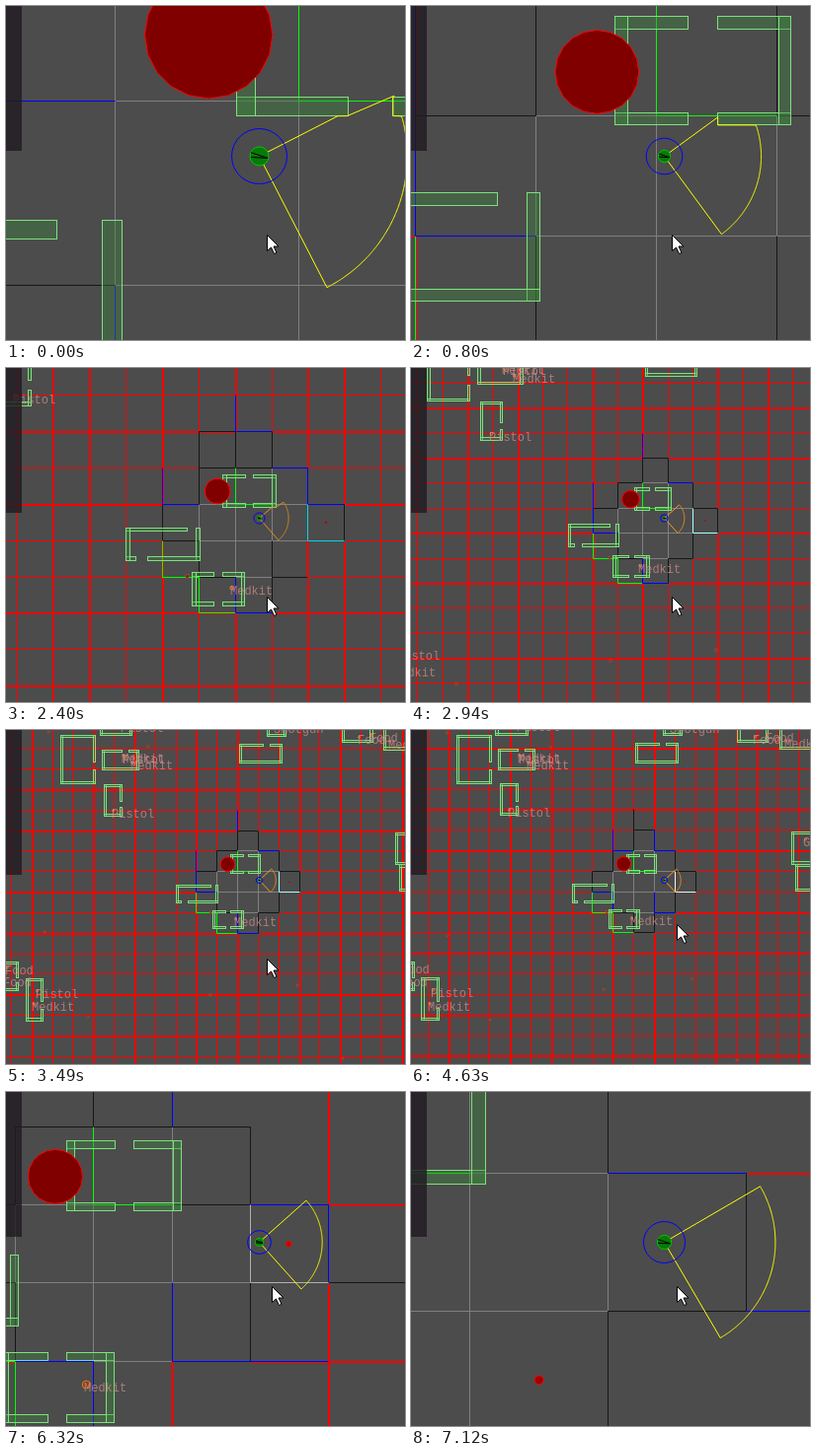
An HTML page with a canvas that plays this animation: 404 by 339 pixels, repeating every 7190 ms.

```html
<!DOCTYPE html>
<html>
<head>
<meta charset="utf-8">
<style>
html, body { margin: 0; width: 404px; height: 339px; overflow: hidden; background: #4c4c4c; }
canvas { display: block; }
</style>
</head>
<body>
<canvas id="stage" width="404" height="339"></canvas>
<script>
const ctx = document.getElementById('stage').getContext('2d');
const W = 404, H = 339, LOOP = 7190, STEP = 67.2, CX = 256.5, CY = 152.5;
const BG = '#4c4c4c';

// Monotone cubic through a few keys, in steps of the clock
const KEYS = [0, 23, 36, 52, 69, 94, 106];
function curve(vals) {
  const n = vals.length, d = [], m = [];
  for (let i = 0; i < n - 1; i++) d.push((vals[i + 1] - vals[i]) / (KEYS[i + 1] - KEYS[i]));
  for (let i = 0; i < n; i++) {
    if (i === 0) m.push(d[0]);
    else if (i === n - 1) m.push(d[n - 2]);
    else m.push(d[i - 1] * d[i] <= 0 ? 0 : 2 * d[i - 1] * d[i] / (d[i - 1] + d[i]));
  }
  return t => {
    if (t >= KEYS[n - 1]) return vals[n - 1] + m[n - 1] * (t - KEYS[n - 1]);
    let i = 0;
    while (t >= KEYS[i + 1]) i++;
    const h = KEYS[i + 1] - KEYS[i], u = (t - KEYS[i]) / h, v = 1 - u;
    return vals[i] * (1 + 2 * u) * v * v + m[i] * h * u * v * v +
      vals[i + 1] * u * u * (3 - 2 * u) - m[i + 1] * h * u * u * v;
  };
}
const logZoom = curve([186.5, 79, 36.85, 20.83, 20.83, 79.3, 140].map(Math.log));
const heroX = curve([0.784, 1.33, 1.66, 2.05, 2.487, 3.114, 3.406]);
const heroY = curve([0.299, 0.368, 0.383, 0.418, 0.437, 0.478, 0.501]);
const facing = curve([17.8, 4, 4, 2, 2, 3.2, 14.7]);

// Sector edge colours, in cell units; xs and ys are the heavy grid lines
const PHASES = [
  { end: 10, xs: [], ys: [], blue: 'M-1 0H0M0 1V2', black: '', grey: 'M0 -1V0' },
  { end: 29, xs: [-1, 3], ys: [-1, 1],
    blue: 'M0 -1H1M2 -1H3V0M-1 -1V1H0M1 2V3', black: 'M-1 0H0M2 0H3M2 -1V0M2 1V2',
    red: 'M3 1V2', pale: '#00ffff' },
  { end: 44, xs: [-4, -3, -1, 1, 3, 4], ys: [-2, 0, 3, 5],
    blue: 'M1 -3V-2H2M2 -1H3V0M-1 -1V0H0M3 0H4M1 2V3H2', black: 'M0 -2V0M0 -2H1M0 -1H2M2 1V2',
    red: 'M3 1V2', pale: '#00d8e8' },
  { end: 61, xs: [-9, -6, -4, -1, 1, 4, 6, 9], ys: [-7, -4, -2, 1, 3, 6, 8],
    blue: 'M1 -3V-2M-1 -1V1H0M2 -1H3M1 2V3H2', black: 'M0 -1H1', pale: '#a8ffff' },
  { end: 82, xs: [-8, -5, -3, 0, 2, 5, 7], ys: [-6, -3, -1, 2, 4, 7, 9],
    blue: 'M0 -2V-1H1M2 -2V-1H3M-1 1H0V2M2 1V2H3', black: 'M1 -3V-2', pale: '#f0f0f0' },
  { end: 100, xs: [2, 4], ys: [0, 2],
    blue: 'M2 -3V-1M3 0H4V1M2 1V2H4M0 2H1M1 2V3', black: 'M0 -1H3V0M3 1V2M4 1H6M2 0H3',
    red: 'M2 2V4', pale: '#b0b0b0' },
  { end: 999, xs: [], ys: [0], blue: 'M3 0H4M4 1H5', black: 'M4 0V1M3 1V2M3 -1V0' }
];
const RIM = 'M1 -2H2V-1H3V0H4V1H3V2H2V3H1V2H0V1H-1V0H0V-1H1V-2';
const GREEN = 'M-1 1V2H0M0 2V3H1M1 -1V0H2';

const T = 0.102;
function doorHouse(x, y) {
  return [[x, y, 0.607, T], [x + 0.85, y, 0.605, T], [x, y + 0.798, 0.607, T],
    [x + 0.85, y + 0.798, 0.605, T], [x, y, T, 0.9], [x + 1.353, y, T, 0.9]];
}
// Far house with one door on the long side
function farHouse(x, y, x2, y2) {
  const w = x2 - x, h = y2 - y, wide = w > h;
  const list = [[x, y, T, h], [x, y2 - T, w, T]];
  if (wide) list.push([x2 - T, y, T, h], [x, y, w * 0.55, T], [x + w * 0.72, y, w * 0.28, T]);
  else list.push([x, y, w, T], [x2 - T, y, T, h * 0.55], [x2 - T, y + h * 0.72, T, h * 0.28]);
  return list;
}
const NEAR = doorHouse(0.66, -0.82);
const WALLS = [
  ...NEAR, ...doorHouse(-0.19, 1.885),
  [-1.99, 0.646, 1.675, T], [-0.068, 0.646, 0.105, 0.9], [-1.99, 1.444, 0.27, T],
  [-1.418, 1.444, 1.455, T], [-1.99, 0.646, T, 0.9],
  ...farHouse(-7.6, -6.63, -5.91, -4.28), ...farHouse(-5.6, -5.94, -3.8, -4.95),
  ...farHouse(-5.7, -7.2, -4.13, -6.63), ...farHouse(-5.5, -4.26, -4.6, -2.72),
  ...farHouse(1.1, -6.22, 3.17, -5.29), ...farHouse(2.45, -7.4, 3.37, -6.6),
  ...farHouse(6.06, -7.5, 7.55, -6.3), ...farHouse(8.08, -7.2, 9.9, -5.94),
  ...farHouse(8.67, -1.9, 10, -0.35), ...farHouse(8.85, -0.33, 10.4, 0.97),
  ...farHouse(-9.3, 5.2, -8.44, 7.26), ...farHouse(-10.6, 4.42, -9.64, 5.8)
];
const ITEMS = [
  ['Medkit', 0.905, 2.3], ['Medkit', -4.55, -5.65], ['Pistol', -4.5, -5.6],
  ['Medkit', -4.13, -5.3], ['Pistol', -5.05, -2.98], ['Pistol', -4.6, -7.15],
  ['Pistol', -8.75, 5.8], ['Medkit', -8.9, 6.45], ['Food', -10.2, 4.65], ['Food', -10.3, 5.25],
  ['Shotgun', 2.84, -7.1], ['Food', 6.9, -6.55], ['Food', 7.5, -6.65],
  ['Medkit', 8.4, -6.35], ['Gun', 9.35, -1.55]
];
// x, y and drift in cells per second
const ROAMERS = [
  [-0.32, 1.98, 0, 0], [-8.37, 2.93, 0.26, 0.18], [-0.34, 6, -0.1, -0.21],
  [3.9, 5.53, -0.06, -0.25], [-6.3, 7.1, 0.28, 0.12], [6.1, 9.1, -0.07, 0.09],
  [-3.37, -6.1, 0.3, 0.05], [-8.2, -6.8, 0.1, 0.05]
];

let s, px, py;
const fx = x => CX + (x - px) * s;
const fy = y => CY + (y - py) * s;
const sx = x => Math.floor(fx(x)) + 0.5;
const sy = y => Math.floor(fy(y)) + 0.5;

function edges(str, color, width = 1) {
  if (!str) return;
  const tok = str.match(/[MHV]|-?\d+/g);
  let x = 0, y = 0;
  ctx.beginPath();
  for (let i = 0; i < tok.length;) {
    const op = tok[i++];
    if (op !== 'V') x = +tok[i++];
    if (op !== 'H') y = +tok[i++];
    if (op === 'M') ctx.moveTo(sx(x), sy(y)); else ctx.lineTo(sx(x), sy(y));
  }
  ctx.strokeStyle = color;
  ctx.lineWidth = width;
  ctx.stroke();
  ctx.lineWidth = 1;
}

function disc(x, y, r, fill, stroke) {
  ctx.beginPath();
  ctx.arc(x, y, r, 0, 7);
  if (fill) { ctx.fillStyle = fill; ctx.fill(); }
  if (stroke) { ctx.strokeStyle = stroke; ctx.stroke(); }
}

function drawGrid(p) {
  ctx.fillStyle = '#ff0000';
  if (s < 60) {
    for (let i = -14; i <= 14; i++) {
      ctx.fillRect(sx(i) - 0.5, 0, 1, H);
      ctx.fillRect(0, sy(i) - 0.5, W, 1);
    }
  }
  for (const x of p.xs) ctx.fillRect(sx(x) - 0.5, 0, 2, H);
  for (const y of p.ys) ctx.fillRect(0, sy(y) - 0.5, W, 2);
  const cells = [];
  for (let y = -2; y <= 2; y++)
    for (let x = -1; x <= 3; x++)
      if (Math.abs(x - 1) + Math.abs(y) <= 2) cells.push([sx(x), sy(y), sx(x + 1), sy(y + 1)]);
  ctx.fillStyle = BG;
  for (const [a, b, c, d] of cells) ctx.fillRect(a - 0.5, b - 0.5, c - a + 2, d - b + 2);
  ctx.strokeStyle = '#808080';
  for (const [a, b, c, d] of cells) ctx.strokeRect(a, b, c - a, d - b);
  edges(RIM, '#161616');
  edges(p.grey, '#808080');
  edges(p.red, '#ff0000', 2);
  edges(p.black, '#161616');
  edges(GREEN, '#00ff00');
  edges(p.blue, '#0000ff');
  if (p.pale) edges('M3 0V1H4', p.pale);
}

function drawWalls() {
  for (const [x, y, w, h] of WALLS) {
    const a = sx(x), b = sy(y), c = sx(x + w), d = sy(y + h);
    if (c < 0 || a > W || d < 0 || b > H) continue;
    ctx.fillStyle = 'rgba(60,130,60,0.4)';
    ctx.fillRect(a, b, c - a, d - b);
    ctx.strokeStyle = '#7fe07f';
    ctx.strokeRect(a, b, c - a, d - b);
  }
}

function drawBlob() {
  const r = 0.347 * s, n = 20;
  ctx.beginPath();
  for (let i = 0; i < n; i++) {
    const a = i * 2 * Math.PI / n;
    ctx.lineTo(fx(0.509) + r * Math.cos(a), fy(-0.362) + r * Math.sin(a));
  }
  ctx.closePath();
  ctx.fillStyle = '#800000';
  ctx.fill();
  ctx.strokeStyle = '#ff0000';
  ctx.stroke();
}

function drawItems(n) {
  const r = Math.max(1, 0.05 * s);
  for (const [x, y, vx, vy] of ROAMERS) {
    const k = (n - 52) * STEP / 1000;
    disc(fx(x + vx * k), fy(y + vy * k), r, '#701c10', '#b05030');
  }
  if (n > 28 && n < 103) disc(fx(3.49), fy(0.5), Math.max(0.6, 0.035 * s), '#c00000', s > 50 && '#ff0000');
  if (n > 99) disc(fx(2.5), fy(1.5), 0.032 * s, '#a00000', '#ff0000');
  ctx.font = '12px "Liberation Mono", "DejaVu Sans Mono", monospace';
  for (const [name, x, y] of ITEMS) {
    disc(fx(x), fy(y), r, '#804010', '#e08030');
    ctx.fillStyle = 'rgba(205,140,140,0.75)';
    ctx.fillText(name, Math.round(fx(x)) - 2, Math.round(fy(y)) + 7);
  }
}

function reach(dx, dy) {
  let best = 0.803;
  for (const [x, y, w, h] of NEAR) {
    const a = (x - px) / dx, b = (x + w - px) / dx, c = (y - py) / dy, d = (y + h - py) / dy;
    const near = Math.max(Math.min(a, b), Math.min(c, d));
    const far = Math.min(Math.max(a, b), Math.max(c, d));
    if (near > 0 && near < far) best = Math.min(best, near);
  }
  return best * s;
}

function drawHero(n) {
  const mid = facing(n), rays = 180;
  ctx.beginPath();
  ctx.moveTo(CX, CY);
  for (let i = 0; i <= rays; i++) {
    const a = (mid - 45 + 90 * i / rays) * Math.PI / 180 + 1e-6;
    const dx = Math.cos(a), dy = Math.sin(a), r = reach(dx, dy);
    ctx.lineTo(CX + dx * r, CY + dy * r);
  }
  ctx.closePath();
  ctx.strokeStyle = s > 42 ? '#ffff00' : s > 30 ? '#e09020' : '#ff9a20';
  ctx.stroke();
  disc(CX, CY, 0.15 * s, null, '#0000ff');
  const r = 0.051 * s;
  disc(CX, CY, r, '#087a08', '#00c800');
  ctx.strokeStyle = '#000';
  ctx.beginPath();
  ctx.moveTo(CX - r * 0.9, CY - r * 0.4);
  ctx.lineTo(CX + r * 0.9, CY + r * 0.2);
  ctx.lineTo(CX - r * 0.9, CY + r * 0.1);
  ctx.stroke();
}

function drawCursor(n) {
  const k = Math.min(1, Math.max(0, (n - 58) / 7));
  ctx.save();
  ctx.translate(Math.round(264 + 5 * k) + 0.5, Math.round(232 - 35 * k) + 0.5);
  const arrow = new Path2D('M0 0V16L4 12.5L7 19L9.5 18L6.5 11.5H11.5Z');
  ctx.fillStyle = '#fff';
  ctx.fill(arrow);
  ctx.strokeStyle = '#000';
  ctx.stroke(arrow);
  ctx.restore();
}

function draw(t) {
  const n = Math.min(106, Math.floor((t + 20) / STEP));
  s = Math.exp(logZoom(n));
  px = heroX(n);
  py = heroY(n);
  ctx.lineWidth = 1;
  ctx.fillStyle = BG;
  ctx.fillRect(0, 0, W, H);
  drawGrid(PHASES.find(p => n < p.end));
  drawWalls();
  drawBlob();
  drawItems(n);
  drawHero(n);
  ctx.fillStyle = 'rgba(32,28,33,0.82)';
  ctx.fillRect(0, 0, 16, 147);
  drawCursor(n);
}

const start = performance.now();
function tick() {
  draw((performance.now() - start) % LOOP);
  requestAnimationFrame(tick);
}
tick();
</script>
</body>
</html>
```
